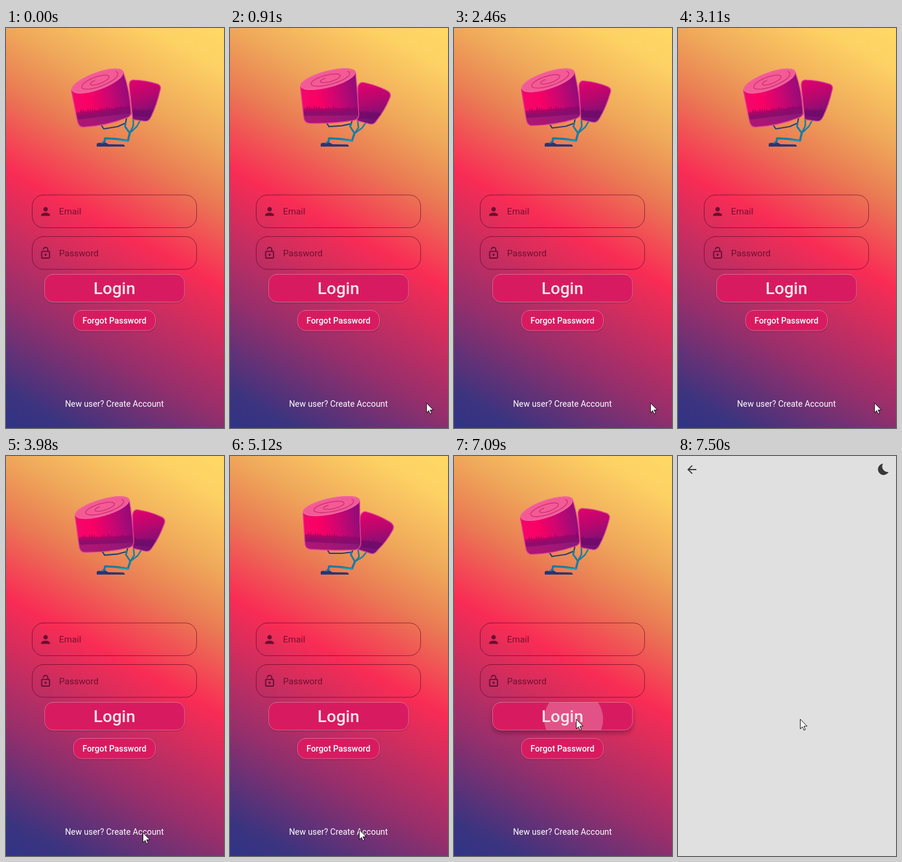
These frames come from a looping animation (370x678 px, 8000 ms). An HTML page with a canvas:

```html
<!DOCTYPE html>
<html lang="en">
<head>
<meta charset="utf-8">
<title>Login</title>
<style>
html, body { margin: 0; width: 100%; height: 100%; overflow: hidden; }
canvas { display: block; width: 370px; height: 678px; }
</style>
</head>
<body>
<canvas id="stage"></canvas>
<script>
const W = 370, H = 678, LOOP = 8000;
const canvas = document.getElementById('stage');
const ctx = canvas.getContext('2d');
const dpr = window.devicePixelRatio || 1;
canvas.width = W * dpr;
canvas.height = H * dpr;

const PERSON = new Path2D('M12 12c2.21 0 4-1.79 4-4s-1.79-4-4-4-4 1.79-4 4 1.79 4 4 4zm0 2c-2.67 0-8 1.34-8 4v2h16v-2c0-2.66-5.33-4-8-4z');
const LOCK = new Path2D('M12 17c1.1 0 2-.9 2-2s-.9-2-2-2-2 .9-2 2 .9 2 2 2zm6-9h-1V6c0-2.76-2.24-5-5-5S7 3.24 7 6h1.9c0-1.71 1.39-3.1 3.1-3.1s3.1 1.39 3.1 3.1v2H6c-1.1 0-2 .9-2 2v10c0 1.1.9 2 2 2h12c1.1 0 2-.9 2-2V10c0-1.1-.9-2-2-2zm0 12H6V10h12v10z');
const BACK = new Path2D('M20 11H7.83l5.59-5.59L12 4l-8 8 8 8 1.41-1.41L7.83 13H20v-2z');
const MOON = new Path2D('M348 13A9.6 9.6 0 1 0 357.5 27A9.3 9.3 0 0 1 348 13Z');
const ARROW = new Path2D('M.5 .5V16.5L4.2 13L6.8 18.8L9.2 17.8L6.7 12H11.8Z');

// [time, value...] stops, eased between neighbours
const SWAY = [[0, 0], [1500, 1], [1750, 1], [2800, 0], [3200, 0], [4800, 1],
  [5400, 1], [6450, 0], [6820, 0], [7090, .12], [8000, .12]];
const POINTER = [[250, 338, 680], [700, 333, 635.5], [3200, 333, 635.5], [3980, 232, 638.5],
  [4400, 226, 645], [4950, 219, 642], [5120, 219, 633.5], [5600, 207, 446]];

const clamp = v => Math.max(0, Math.min(1, v));
const lerp = (a, b, k) => a + (b - a) * k;
const mix = (a, b, k) => a.map((v, i) => lerp(v, b[i], k));
const smooth = k => k * k * (3 - 2 * k);

function track(stops, t) {
  let i = stops.findIndex(s => s[0] > t);
  if (i < 0) i = stops.length;
  const a = stops[Math.max(0, i - 1)], b = stops[Math.min(i, stops.length - 1)];
  const k = b[0] > a[0] ? smooth(clamp((t - a[0]) / (b[0] - a[0]))) : 0;
  return mix(a, b, k).slice(1);
}

function gradient(x0, y0, x1, y1, stops) {
  const g = ctx.createLinearGradient(x0, y0, x1, y1);
  stops.forEach(([at, color]) => g.addColorStop(at, color));
  return g;
}

function text(str, x, y, size, weight, color, align = 'left') {
  ctx.font = `${weight} ${size}px Roboto, sans-serif`;
  ctx.textAlign = align;
  ctx.fillStyle = color;
  ctx.fillText(str, x, y);
}

function icon(path, cx, cy, color) {
  ctx.save();
  ctx.translate(cx, cy);
  ctx.scale(.95, .95);
  ctx.translate(-12, -12);
  ctx.fillStyle = color;
  ctx.fill(path);
  ctx.restore();
}

function box(x, y, w, h, r) {
  const p = new Path2D();
  p.roundRect(x, y, w, h, r);
  return p;
}

function line(pts, width, color) {
  ctx.beginPath();
  ctx.moveTo(pts[0], pts[1]);
  for (let i = 2; i < pts.length; i += 2) ctx.lineTo(pts[i], pts[i + 1]);
  ctx.lineWidth = width;
  ctx.strokeStyle = color;
  ctx.stroke();
}

function backdrop() {
  ctx.fillStyle = gradient(W, 0, 0, H, [[0, '#ffd865'], [.08, '#fdd264'], [.23, '#efa75a'],
    [.34, '#ea7c54'], [.43, '#f24e55'], [.5, '#f92c55'], [.75, '#952f6c'], [.93, '#3b347f'], [1, '#303386']]);
  ctx.fillRect(0, 0, W, H);
}

function field(y, label, path) {
  ctx.lineWidth = 1;
  ctx.strokeStyle = 'rgba(75,0,40,.62)';
  ctx.stroke(box(44.5, y, 279, 55.5, 19));
  icon(path, 67.2, y + 28, 'rgba(50,0,28,.68)');
  text(label, 90, y + 33, 15.2, 400, 'rgba(50,0,28,.64)');
}

function button(x, y, w, h, label, base, size, press = 0, ripple = 0) {
  const shape = box(x, y, w, h, 14);
  ctx.save();
  ctx.shadowColor = 'rgba(60,0,40,.4)';
  ctx.shadowBlur = (3 + 5 * press) * dpr;
  ctx.shadowOffsetY = (1 + 4 * press) * dpr;
  ctx.fillStyle = '#d81b60';
  ctx.fill(shape);
  ctx.restore();
  if (ripple) {
    ctx.save();
    ctx.clip(shape);
    ctx.fillStyle = 'rgba(255,255,255,.24)';
    ctx.beginPath();
    ctx.arc(203, 446, ripple, 0, 7);
    ctx.fill();
    ctx.restore();
  }
  ctx.lineWidth = 1;
  ctx.strokeStyle = 'rgba(255,190,205,.45)';
  ctx.stroke(shape);
  text(label, 184, base, size, 500, size > 20 ? '#f8e6ec' : '#fff', 'center');
}

// jagged grass inside the current clip, following a slanted base line
function grass(x0, y0, x1, y1, tall, color, seed) {
  const n = Math.round((x1 - x0) / 2);
  ctx.beginPath();
  ctx.moveTo(x0, y0 + 8);
  for (let i = 0; i <= n; i++) {
    seed = (seed * 16807) % 2147483647;
    const lift = (i % 2 ? .25 : .4 + .6 * (seed % 100) / 100) * tall;
    ctx.lineTo(lerp(x0, x1, i / n), lerp(y0, y1, i / n) - lift);
  }
  ctx.lineTo(x1, y1 + 8);
  ctx.fillStyle = color;
  ctx.fill();
}

function sideCrown(k) {
  const p = mix(
    [209, 97, 209, 87, 218, 88, 254, 94, 264, 96, 262, 104, 246, 151, 242, 159, 235, 158, 215, 155],
    [221, 103, 224, 92, 233, 95, 270, 111, 281, 117, 276, 126, 251, 159, 245, 168, 238, 165, 216, 158], k);
  const shape = new Path2D();
  shape.moveTo(p[0], p[1]);
  shape.quadraticCurveTo(p[2], p[3], p[4], p[5]);
  shape.quadraticCurveTo((p[4] + p[6]) / 2 + 2, (p[5] + p[7]) / 2 - 2, p[6], p[7]);
  shape.quadraticCurveTo(p[8], p[9], p[10], p[11]);
  shape.quadraticCurveTo((p[10] + p[12]) / 2 + 2, (p[11] + p[13]) / 2 + 3, p[12], p[13]);
  shape.quadraticCurveTo(p[14], p[15], p[16], p[17]);
  shape.lineTo(p[18], p[19]);
  shape.closePath();
  ctx.fillStyle = gradient(p[4], p[5], p[14], p[15], [[0, '#e0006c'], [.4, '#b9076e'], [1, '#651478']]);
  ctx.fill(shape);
  ctx.save();
  ctx.clip(shape);
  grass(p[18] - 4, p[19] - 13, p[12] + 8, p[13] - 8, 9, 'rgba(104,10,104,.65)', 91);
  ctx.restore();
  ctx.lineWidth = 1.5;
  ctx.strokeStyle = '#dc4b91';
  ctx.stroke(shape);
}

function mainCrown(k) {
  const p = mix(
    [111, 106, 121, 157, 123, 168, 131, 168, 170, 166, 205, 152, 214, 149, 212, 141, 200, 78],
    [124, 98, 127, 146, 127, 157, 136, 158, 175, 161, 213, 159, 222, 157, 222, 147, 220, 76], k);
  const [cx, cy, rx, ry, tilt] = mix([155.5, 90, 46, 14, -.35], [172, 85, 48.5, 13, -.21], k);
  const shape = new Path2D();
  shape.moveTo(p[0], p[1]);
  shape.lineTo(p[2], p[3]);
  shape.quadraticCurveTo(p[4], p[5], p[6], p[7]);
  shape.quadraticCurveTo(p[8], p[9], p[10], p[11]);
  shape.quadraticCurveTo(p[12], p[13], p[14], p[15]);
  shape.quadraticCurveTo(p[14] - 2, p[15] - 35, p[16], p[17]);
  shape.ellipse(cx, cy, rx, ry, tilt, 0, Math.PI, true);
  shape.closePath();
  ctx.fillStyle = gradient(p[0], 130, p[14], 112, [[0, '#f4076c'], [.3, '#fa0064'], [.6, '#d00670'], [1, '#8f0c79']]);
  ctx.fill(shape);

  ctx.save();
  ctx.clip(shape);
  const [lx, ly, rX, rY] = [p[2] - 6, p[3] - 8, p[14] + 3, p[15] - 4];
  ctx.beginPath();
  ctx.moveTo(lx, ly);
  ctx.lineTo(rX, rY);
  ctx.lineTo(rX, rY + 40);
  ctx.lineTo(lx, ly + 40);
  ctx.fillStyle = 'rgba(120,35,125,.6)';
  ctx.fill();
  grass(lx, ly - 1, rX, rY - 1, 11, 'rgba(128,8,104,.65)', 37);
  ctx.restore();
  ctx.lineWidth = 1.5;
  ctx.strokeStyle = '#e5418d';
  ctx.stroke(shape);

  ctx.save();
  ctx.translate(cx, cy);
  ctx.rotate(tilt);
  ctx.beginPath();
  ctx.ellipse(0, 0, rx - .5, ry, 0, 0, 7);
  ctx.fillStyle = '#f45a94';
  ctx.fill();
  ctx.lineWidth = 1.5;
  ctx.strokeStyle = '#ee68a8';
  ctx.stroke();
  ctx.beginPath();
  for (let a = 0; a <= 11; a += .15) {
    const r = .82 - a * .055;
    ctx.lineTo(Math.cos(a - .4) * rx * r, Math.sin(a - .4) * ry * r);
  }
  ctx.lineWidth = 1.3;
  ctx.strokeStyle = '#c92d77';
  ctx.stroke();
  ctx.restore();
}

function trunk(k) {
  const teal = '#167da5', navy = '#243c78';
  const [jx, jy] = mix([210, 178], [212, 179], k);
  const loop = mix([162, 165, 166, 171, 190, 167, 203, 161, 205, 150],
    [164, 157, 169, 165, 190, 165, 207, 163, 210, 155], k);
  const right = mix([216, 155, 216, 166, 222, 167, 228, 156],
    [217, 156, 219, 171, 225, 171, 233, 161], k);
  ctx.lineCap = ctx.lineJoin = 'round';
  line(loop, 2.2, navy);
  line([loop[6], loop[7], lerp(202, 205, k), 167, jx, jy], 3, teal);
  line([right[0], right[1], right[2], right[3], jx, jy], 2.6, teal);
  line([jx, jy, right[4], right[5], right[6], right[7]], 2.4, teal);
  line([jx, jy, 207, 191, 187, 188, 168, 187, 167, 197], 3.6, teal);
  line([207, 191, 190, 190], 2, '#2498b6');
  line([167, 191, 160, 197], 2, teal);
}

function ground() {
  ctx.beginPath();
  ctx.moveTo(154, 201);
  ctx.lineTo(154, 196);
  ctx.quadraticCurveTo(158, 193, 163, 196);
  ctx.quadraticCurveTo(167, 192, 174, 197);
  ctx.lineTo(200, 197.5);
  ctx.lineTo(202, 201);
  ctx.closePath();
  ctx.fillStyle = '#293670';
  ctx.fill();
}

function login(t) {
  const k = track(SWAY, t)[0];
  backdrop();
  trunk(k);
  ground();
  sideCrown(k);
  mainCrown(k);
  field(283, 'Email', PERSON);
  field(353.5, 'Password', LOCK);
  const press = clamp((t - 6820) / 270);
  button(65.5, 417.5, 237.5, 47, 'Login', 451, 28.5, press, press && lerp(12, 50, press));
  button(114.5, 478.5, 139, 34.5, 'Forgot Password', 500.5, 14.3);
  text('New user? Create Account', 184, 642, 14.25, 400, '#fff', 'center');
}

function nextPage(t) {
  const k = clamp((t - 7220) / 280);
  if (!k) return;
  ctx.save();
  ctx.globalAlpha = smooth(k);
  ctx.translate(0, H * .25 * (1 - k) ** 2);
  ctx.fillStyle = '#e0e0e0';
  ctx.fillRect(0, 0, W, H);
  icon(BACK, 23.5, 23, '#383838');
  ctx.fillStyle = '#383838';
  ctx.fill(MOON);
  ctx.restore();
}

function pointer(t) {
  if (t < POINTER[0][0]) return;
  const [x, y] = track(POINTER, t);
  ctx.save();
  ctx.translate(x, y);
  ctx.fillStyle = '#fff';
  ctx.fill(ARROW);
  ctx.lineJoin = 'miter';
  ctx.lineWidth = 1;
  ctx.strokeStyle = '#111';
  ctx.stroke(ARROW);
  ctx.restore();
}

function draw(now) {
  const t = now % LOOP;
  ctx.setTransform(dpr, 0, 0, dpr, 0, 0);
  login(t);
  nextPage(t);
  pointer(t);
}

const start = performance.now();
function tick() {
  draw(performance.now() - start);
  requestAnimationFrame(tick);
}
tick();
</script>
</body>
</html>
```
